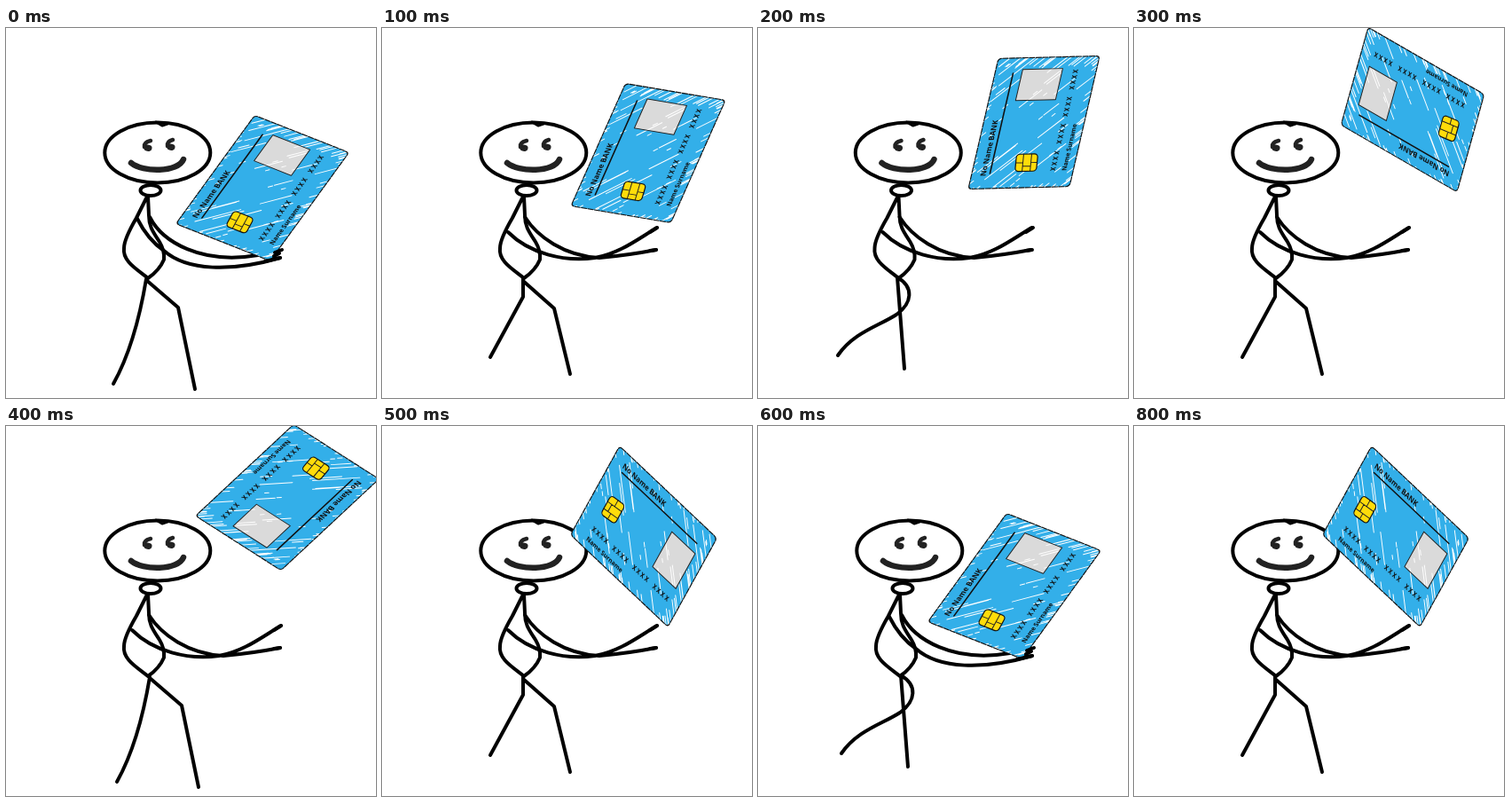
An HTML page with a canvas for the animation above (0.9 s loop, 417 by 417 pixels).

```html
<!DOCTYPE html>
<html lang="en">
<head>
<meta charset="utf-8">
<title>Juggling a bank card</title>
<style>
  html, body { margin: 0; width: 100%; height: 100%; overflow: hidden; background: #fff; }
  canvas { display: block; width: 417px; height: 417px; }
</style>
</head>
<body>
<canvas id="stage" width="417" height="417"></canvas>
<script>
const ctx = document.getElementById('stage').getContext('2d');
const LOOP = 900;

const legs = {
  stride: 'M158 283C151 325 140 367 121 401M158 284L194 315L213 407',
  bend: 'M159 282V303L122 371M159 285L194 316L212 390',
  cross: 'M161 281L169 384M161 281C180 292 178 310 160 323C140 336 112 343 94 369'
};
const torso = 'M159 190L147 214Q133 238 133 248C131 263 148 272 160 282' +
  'Q173 273 178 261Q179 251 173 241C166 230 161 224 161 211L160 190';
const arms = {
  open: 'M142 230C166 254 205 264 240 259C268 254 288 238 310 225' +
    'M161 213C175 235 205 257 245 259Q278 256 309 250',
  hold: 'M148 215C156 231 165 242 178 251C204 274 254 275 309 259' +
    'M162 213C176 241 220 267 284 256'
};
const hands = {
  open: 'M302 230L310 225M302 251L309 250',
  hold: 'M292 263L309 259M303 253L311 250M302 257L308 254'
};

// Each pose: start time, legs, leg shift, body shift, arms, card centre and angle
const poses = [
  [0, 'stride', 0, 0, 'hold', 289, 180.5, -54],
  [100, 'bend', 0, 0, 'open', 300, 141, -66],
  [200, 'cross', -4, -1.5, 'open', 311, 106.5, -77],
  [300, 'bend', 0, 0, 'open', 314, 92, -150],
  [400, 'stride', 4, 0, 'open', 317, 80.5, -223],
  [500, 'bend', 0, 0, 'open', 295, 124.5, -316.6],
  [600, 'cross', 0, 0, 'hold', 289, 180.5, -414],
  [800, 'bend', 0, 0, 'open', 295, 124.5, -316.6]
];

let seed = 17;
function random() {
  seed = (seed * 16807) % 2147483647;
  return seed / 2147483647;
}

// Diagonal gaps in the crayon filling, denser along the edges
const scratches = new Path2D();
function scratch(x, y, len) {
  scratches.moveTo(x, y);
  scratches.lineTo(x + len * 0.68, y + len * 0.73);
}
for (let i = 0; i < 45; i++) {
  scratch(random() * 148, random() * 111, 4 + 48 * random() ** 2);
}
for (let i = 0; i < 20; i++) {
  scratch(random() * 148, -3, 3 + random() * 6);
  scratch(random() * 148, 104 + random() * 4, 12);
  scratch(-3, random() * 111, 3 + random() * 6);
  scratch(136 + random() * 6, random() * 111, 18);
}

function line(d, width, colour = '#000') {
  ctx.lineWidth = width;
  ctx.strokeStyle = colour;
  ctx.stroke(new Path2D(d));
}

function ellipse(x, y, rx, ry) {
  ctx.beginPath();
  ctx.ellipse(x, y, rx, ry, 0, 0, 7);
  ctx.lineWidth = 4;
  ctx.strokeStyle = '#000';
  ctx.stroke();
}

function label(text, x, y, font, spacing = 0) {
  ctx.font = font;
  ctx.letterSpacing = spacing + 'px';
  ctx.fillText(text, x, y);
}

function drawBody(shift, armPose) {
  ctx.save();
  ctx.translate(shift, 0);
  ellipse(170.8, 140.5, 59.5, 34);
  line('M169 106L176 110L182 108', 3);
  ellipse(163, 183, 11.5, 6);
  line('M163 127Q155 129 156 134M188 126Q181 128 182 133', 4.5, '#222');
  line('M159 135L161 135.5M185 134L187 134.5', 7, '#222');
  line('M141 152C154 163 194 163 200 148', 6.5, '#222');
  line(torso, 4);
  line(arms[armPose], 4);
  ctx.restore();
}

function drawChip() {
  ctx.save();
  ctx.translate(27.5, 57.5);
  ctx.transform(1, -0.13, 0, 1, 0, 0);
  ctx.fillStyle = '#ffdc0a';
  ctx.beginPath();
  ctx.roundRect(-10, -12, 20, 24, 4);
  ctx.fill();
  ctx.lineWidth = 1.2;
  ctx.strokeStyle = '#111';
  ctx.stroke();
  line('M-10 -4H10M-10 5H10M0 -12V-4M0 5V12M-4 -4V5', 1, '#222');
  ctx.restore();
}

function drawCard(x, y, angle) {
  ctx.save();
  ctx.translate(x, y);
  ctx.rotate(angle * Math.PI / 180);
  ctx.transform(1, 0, 0.25, 0.97, 0, 0);
  ctx.translate(-74, -55.5);

  const shape = new Path2D();
  shape.roundRect(-1.5, -1.5, 151, 114, 4);
  ctx.fillStyle = '#33afe9';
  ctx.fill(shape);
  ctx.fillStyle = '#dadada';
  ctx.fillRect(100, 29, 36, 45);
  ctx.save();
  ctx.clip(shape);
  ctx.lineWidth = 1.1;
  ctx.strokeStyle = '#fff';
  ctx.stroke(scratches);
  ctx.restore();
  ctx.setLineDash([6, 1.5]);
  ctx.lineWidth = 1.2;
  ctx.strokeStyle = '#111';
  ctx.stroke(shape);
  ctx.setLineDash([]);

  line('M100 29H136V74H100Z', 1, '#222');
  line('M16 19H132', 1.6, '#111');
  drawChip();

  ctx.fillStyle = '#111';
  label('No Name BANK', 13, 14.5, 'bold 8.4px "Open Sans", sans-serif');
  label('XXXX XXXX XXXX XXXX', 17, 92, 'bold 7.6px "DejaVu Sans Mono", monospace', 1.7);
  label('Name Surname', 17, 104.5, 'bold 7px "Open Sans", sans-serif');
  ctx.restore();
}

function draw(now) {
  const t = now % LOOP;
  const [, legPose, legShift, bodyShift, armPose, ...card] = poses.findLast(p => p[0] <= t);
  ctx.fillStyle = '#fff';
  ctx.fillRect(0, 0, 417, 417);
  ctx.lineCap = ctx.lineJoin = 'round';
  ctx.save();
  ctx.translate(legShift, 0);
  line(legs[legPose], 4);
  ctx.restore();
  drawBody(bodyShift, armPose);
  drawCard(...card);
  line(hands[armPose], 4);
}

const start = performance.now();
function tick() {
  draw(performance.now() - start);
  requestAnimationFrame(tick);
}
tick();
</script>
</body>
</html>
```
